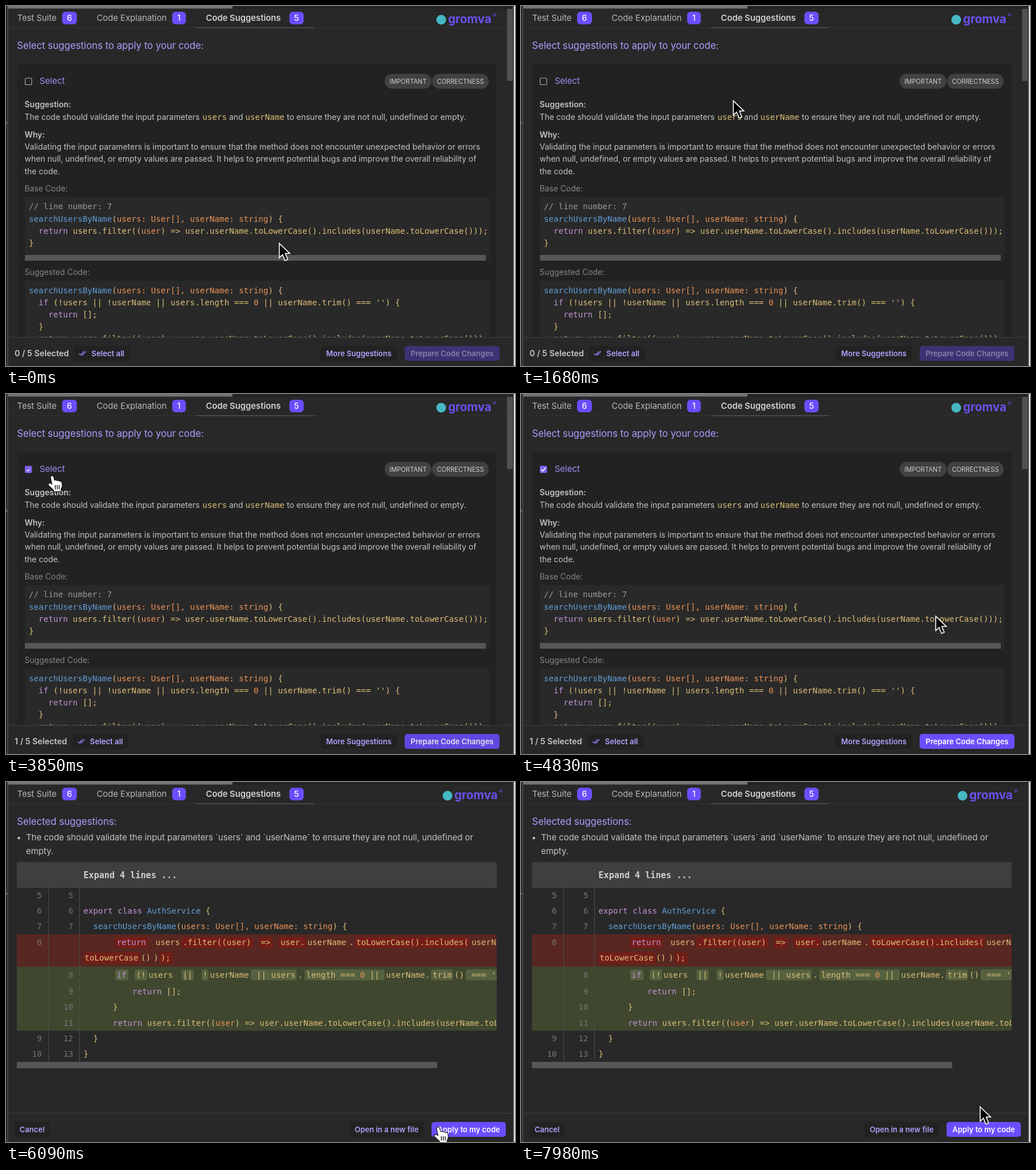
Animation, 890 px wide and 629 px high, one loop 8000 ms. Source, as an HTML page with a canvas:

```html
<!DOCTYPE html>
<html lang="en">
<head>
<meta charset="utf-8">
<title>Code suggestions</title>
<style>
html, body { margin: 0; width: 100%; height: 100%; overflow: hidden; background: #282828; }
canvas { display: block; width: 890px; height: 629px; }
</style>
</head>
<body>
<canvas id="stage" width="890" height="629"></canvas>
<script>
const ctx = document.getElementById('stage').getContext('2d');
const LOOP = 8000, CLICK = 3710, APPLY = 6090;
const UI = 'Inter, sans-serif';
const MONO = '14.19px "DejaVu Sans Mono", monospace';
const VIOLET = '#6b4dff', LILAC = '#b5a0ff', GREY = '#c3c3c3';
const INK = { y: '#dcbd78', b: '#609dd6', o: '#ea9255', p: '#c193d6', g: '#989898' };

const clamp = v => Math.max(0, Math.min(1, v));
const smooth = v => v * v * (3 - 2 * v);

function rect(x, y, w, h, color) {
  ctx.fillStyle = color;
  ctx.fillRect(x, y, w, h);
}

function round(x, y, w, h, r, color) {
  ctx.beginPath();
  ctx.roundRect(x, y, w, h, r);
  ctx.fillStyle = color;
  ctx.fill();
}

function text(str, x, y, size, color, weight = 400, align = 'left') {
  ctx.font = `${weight} ${size}px ${UI}`;
  ctx.fillStyle = color;
  ctx.textAlign = align;
  ctx.fillText(str, x, y);
}

// "~b" switches to ink b for the characters that follow
function code(str, x, y) {
  ctx.font = MONO;
  ctx.textAlign = 'left';
  ctx.fillStyle = INK.y;
  str.split(/(~[a-z])/).forEach(part => {
    if (/^~[a-z]$/.test(part)) {
      ctx.fillStyle = INK[part[1]];
    } else {
      ctx.fillText(part, x, y);
      x += ctx.measureText(part).width;
    }
  });
}

function mark(x, y, x1, color) {
  round(x, y - 14, x1 - x, 19, 4, color);
}

function button(label, x, w, fill, color) {
  round(x, 594, w, 26, 5, fill);
  text(label, x + w / 2, 611.8, 13, color, 600, 'center');
}

function mix(a, b, k) {
  return `rgb(${a.map((v, i) => Math.round(v + (b[i] - v) * k)).join(',')})`;
}

function tick(points, color, width) {
  ctx.beginPath();
  points.forEach(([x, y]) => ctx.lineTo(x, y));
  ctx.strokeStyle = color;
  ctx.lineWidth = width;
  ctx.lineCap = ctx.lineJoin = 'round';
  ctx.stroke();
}

const SIGNATURE = '~bsearchUsersByName~y(~ousers: User[], userName: string~y) {';
const FILTER = '~preturn~y users.filter((~ouser~y) => user.userName.toLowerCase().includes(userName.toLowerCase()));';

function frame(diff) {
  rect(0, 0, 890, 629, '#282828');
  rect(0, 0, 890, 5, '#232323');
  rect(3, 0, 393, 4.5, '#737373');
  rect(0, 0, 2, 629, '#252525');
  rect(2, 0, 2, 629, '#484848');
  rect(886, 0, 2, 629, '#3d3d3d');
  rect(888, 0, 2, 629, '#e2e2e2');
  rect(0, diff ? 194 : 203, 2, 2, '#8a8a8a');
  rect(4, 37.5, 882 - (diff ? 0 : 10), 1, '#353535');
  rect(332, 37, 206, 1.5, '#505050');

  const tabs = [['Test Suite', 19.5, 98, 26, 6], ['Code Explanation', 158.5, 290.5, 24, 1], ['Code Suggestions', 349.5, 495.5, 25, 5]];
  tabs.forEach(([label, x, bx, w, n], i) => {
    text(label, x, 26, 14.8, i === 2 ? '#d2d2d2' : '#b9b9b9', i === 2 ? 600 : 400);
    round(bx, 10, w, 22, 6, VIOLET);
    text(n, bx + w / 2, 26, 14, '#fff', 500, 'center');
  });

  const shift = diff ? 11 : 0;
  ctx.beginPath();
  ctx.arc(761 + shift, 24, 8.5, 0, 7);
  ctx.fillStyle = '#46b8c4';
  ctx.fill();
  text('gromva', 773 + shift, 30, 20.5, '#6d50ee', 700);
  text('ai', 851 + shift, 18, 8, '#6d50ee');
}

function footer() {
  rect(4, 579, 882, 50, '#282828');
  rect(4, 578.5, 882, 1, '#414141');
}

function checkbox(t) {
  if (t < CLICK) {
    ctx.beginPath();
    ctx.roundRect(33.5, 126, 11.5, 11.5, 2);
    ctx.strokeStyle = '#b0b0b0';
    ctx.lineWidth = 1.1;
    ctx.stroke();
    return;
  }
  round(33, 125.5, 12.5, 12.5, 2, '#8062ee');
  const k = clamp((t - 3770) / 300);
  if (k > 0) {
    const s = 0.35 + 0.65 * k, cy = 133.5 - 1.5 * k;
    tick([[-3.6, 0.2], [-1, 2.8], [3.8, -3]].map(([x, y]) => [39 + x * s, cy + y * s]), '#fff', 1.1 + 0.5 * k);
  }
}

function listScreen(t) {
  frame(false);
  rect(876, 5, 10, 126, '#505050');
  text('Select suggestions to apply to your code:', 19.2, 74.5, 16.7, '#b09cff');
  round(19, 101, 839, 500, 5, '#222222');
  checkbox(t);
  text('Select', 58.7, 136, 15, '#a58bf5');
  [['IMPORTANT', 662, 82], ['CORRECTNESS', 745, 99]].forEach(([label, x, w]) => {
    round(x, 118.5, w, 26, 13, '#3f4143');
    text(label, x + w / 2, 135.7, 11.1, '#cfcfcf', 400, 'center');
  });

  text('Suggestion:', 32.5, 177, 14, GREY, 600);
  text('The code should validate the input parameters', 32.5, 199, 13.95, GREY);
  code('users', 343.5, 199);
  text('and', 390, 199, 13.95, GREY);
  code('userName', 418.5, 199);
  text('to ensure they are not null, undefined or empty.', 491, 199, 14, GREY);
  text('Why:', 32.5, 230, 14, GREY, 600);
  [
    'Validating the input parameters is important to ensure that the method does not encounter unexpected behavior or errors',
    'when null, undefined, or empty values are passed. It helps to prevent potential bugs and improve the overall reliability of',
    'the code.'
  ].forEach((line, i) => text(line, 32.5, 251 + i * 21.4, 13.95, GREY));

  text('Base Code:', 32.5, 324, 13.9, '#858585');
  rect(33, 334, 812, 111, '#292929');
  ['~g// line number: 7', SIGNATURE, '  ' + FILTER, '}'].forEach((line, i) => code(line, 40, 355.3 + i * 21.2));
  rect(33, 435, 806, 10, '#565757');

  text('Suggested Code:', 32.5, 470, 13.9, '#858585');
  rect(33, 480, 812, 110, '#292929');
  [
    SIGNATURE,
    "  ~pif~y (!users || !userName || users.length === ~o0~y || userName.trim() === '') {",
    '    ~preturn~y [];',
    '  }',
    '  ' + FILTER
  ].forEach((line, i) => code(line, 40, 501.5 + i * 21.2));

  footer();
  const on = t >= CLICK, dx = on ? -2.5 : 0;
  text(on ? '1 / 5 Selected' : '0 / 5 Selected', 15, 612, 14.3, '#c6c6c6', 600);
  round(118.5 + dx, 594, 98, 26, 5, '#222222');
  tick([[128 + dx, 607.5], [130.5 + dx, 610], [136 + dx, 603.5]], '#9b82ff', 1.2);
  tick([[132.8 + dx, 609], [133.8 + dx, 610], [139.5 + dx, 603.5]], '#9b82ff', 1.2);
  text('Select all', 149.3 + dx, 611.8, 13.2, LILAC, 600);
  button('More Suggestions', 550, 134, '#222222', LILAC);
  const k = clamp((t - CLICK) / 180);
  button('Prepare Code Changes', 697, 166, mix([62, 49, 116], [107, 77, 255], k), mix([139, 130, 166], [255, 255, 255], k));
}

function diffScreen() {
  frame(true);
  text('Selected suggestions:', 19.2, 74.5, 16.7, '#b09cff');
  ctx.beginPath();
  ctx.arc(22.5, 98, 2.2, 0, 7);
  ctx.fillStyle = GREY;
  ctx.fill();
  text('The code should validate the input parameters `users` and `userName` to ensure they are not null, undefined or', 35, 102, 14.9, GREY);
  text('empty.', 35, 125.5, 14.9, GREY);

  rect(19, 140, 839, 44, '#3d3f41');
  rect(19, 183.5, 839, 1, '#4b4d4f');
  ctx.font = 'bold 15.1px "DejaVu Sans Mono", monospace';
  ctx.fillStyle = '#d0d0d0';
  ctx.textAlign = 'left';
  ctx.fillText('Expand 4 lines ...', 135.5, 167.5);

  rect(19, 266, 839, 57, '#582721');
  rect(19, 322.5, 839, 112, '#3f472f');
  rect(74, 184, 1, 305, '#4c4c4c');
  rect(128, 184, 1, 305, '#4c4c4c');

  const rows = [[203, 5, 5], [230, 6, 6], [257.3, 7, 7], [285, 8, ''], [341.5, '', 8], [371, '', 9], [398, '', 10], [425.5, '', 11], [453, 9, 12], [480, 10, 13]];
  ctx.font = MONO;
  ctx.textAlign = 'right';
  ctx.fillStyle = '#757575';
  rows.forEach(([y, a, b]) => {
    ctx.fillText(a, 62.5, y);
    ctx.fillText(b, 117.5, y);
  });

  ctx.save();
  ctx.beginPath();
  ctx.rect(129, 184, 729, 305);
  ctx.clip();
  code('~pexport class ~bAuthService~y {', 135.5, 230);
  code(SIGNATURE, 152.5, 257.3);

  const red = '#741d18', green = '#566140';
  [[191, 248], [307, 432], [443, 466], [477, 524], [610, 811]].forEach(([a, b]) => mark(a, 285, b, red));
  [[136, 235], [268, 291]].forEach(([a, b]) => mark(a, 312, b, red));
  [[191, 214], [225, 247], [307, 328], [342, 354], [428, 508], [522, 662], [743, 781], [804, 870]].forEach(([a, b]) => mark(a, 341.5, b, green));
  [['~preturn', 193.5], ['users', 261.5], ['.filter((user)', 309], ['=>', 445.5], ['user.', 480], ['userName', 527], ['.', 600], ['toLowerCase().includes(', 612.5], ['userName.', 814]].forEach(([s, x]) => code(s, x, 285));
  [['toLowerCase', 137.5], ['()', 236], [')', 258], [');', 270.5]].forEach(([s, x]) => code(s, x, 312));
  [['~pif', 193.5], ['(!', 227.5], ['users', 249], ['||', 309], ['!', 344], ['userName', 356.5], ['|| users', 438], ['.', 510], ['length === ~o0~y ||', 525], ['userName.', 664.5], ['trim', 746], ['()', 784], ["=== '') {", 814]].forEach(([s, x]) => code(s, x, 341.5));
  code('~preturn~y [];', 221, 371);
  code('}', 187, 398);
  code(FILTER, 187, 425.5);
  code('}', 152.5, 453);
  code('}', 135.5, 480);
  ctx.restore();
  rect(19, 489, 735, 11, '#555656');

  footer();
  button('Cancel', 15, 61, '#222222', LILAC);
  button('Open in a new file', 600, 131, '#222222', LILAC);
  button('Apply to my code', 744, 130, VIOLET, '#fff');
}

// start, end, x, y, optional control point of a bent path
const moves = [
  [0, 210, 478, 395],
  [560, 1400, 371, 165],
  [1610, 1680, 370.5, 164],
  [1890, 1960, 369, 164],
  [2840, 3640, 80, 144],
  [4230, 5040, 757, 604, 706, -138],
  [5670, 5740, 755, 604],
  [6400, 7210, 469, 402],
  [7210, 7280, 468, 401]
];

function pointer(t) {
  let x = 477, y = 413;
  for (const [a, b, x1, y1, cx = (x + x1) / 2, cy = (y + y1) / 2] of moves) {
    if (t < a) break;
    const u = smooth(clamp((t - a) / (b - a))), v = 1 - u;
    x = v * v * x + 2 * u * v * cx + u * u * x1;
    y = v * v * y + 2 * u * v * cy + u * u * y1;
  }
  // the loop ends halfway through this last move
  const k = 2 * smooth(clamp((t - 7560) / 420) / 2);
  return [x + 334 * k, y + 165 * k];
}

function arrow(x, y) {
  ctx.save();
  ctx.translate(x, y);
  ctx.beginPath();
  [[1.6, 3.6], [1.6, 25], [6.9, 20], [11.3, 30.8], [14.6, 29.4], [10.2, 18.8], [17.2, 18.6]].forEach(p => ctx.lineTo(...p));
  ctx.closePath();
  ctx.lineJoin = 'miter';
  ctx.lineWidth = 3.2;
  ctx.strokeStyle = '#fff';
  ctx.stroke();
  ctx.fillStyle = '#000';
  ctx.fill();
  ctx.restore();
}

function hand(x, y) {
  ctx.save();
  ctx.translate(x - 7, y - 2);
  const p = new Path2D('M5.5 4 C5 .8 9 .2 9.8 3 L11.8 10 C12.2 8.4 15.4 8.2 16 10.4 C17 8.8 19.8 9.2 20.2 11.4 C21.6 10.2 23.8 11 24.2 13 C25 17 25 20.5 23 23.5 L22.6 28 L11.2 28 L10.4 25.5 L3 18.6 C-.2 15.6 2.4 13 5 14.8 L8 17 Z');
  ctx.lineJoin = 'round';
  ctx.lineWidth = 2;
  ctx.strokeStyle = '#000';
  ctx.stroke(p);
  ctx.fillStyle = '#fff';
  ctx.fill(p);
  [13, 16.4, 19.8].forEach(lx => tick([[lx, 17.5], [lx + 0.4, 24]], '#000', 1.3));
  ctx.restore();
}

function draw(t) {
  if (t < APPLY) listScreen(t); else diffScreen();
  const [x, y] = pointer(t);
  const onLabel = x > 33 && x < 104 && y > 120 && y < 146;
  const onButton = y > 594 && x > (t < APPLY ? 697 : 744);
  (onLabel || onButton ? hand : arrow)(x, y);
}

const start = performance.now();
function loop() {
  draw((performance.now() - start) % LOOP);
  requestAnimationFrame(loop);
}
loop();
</script>
</body>
</html>
```
